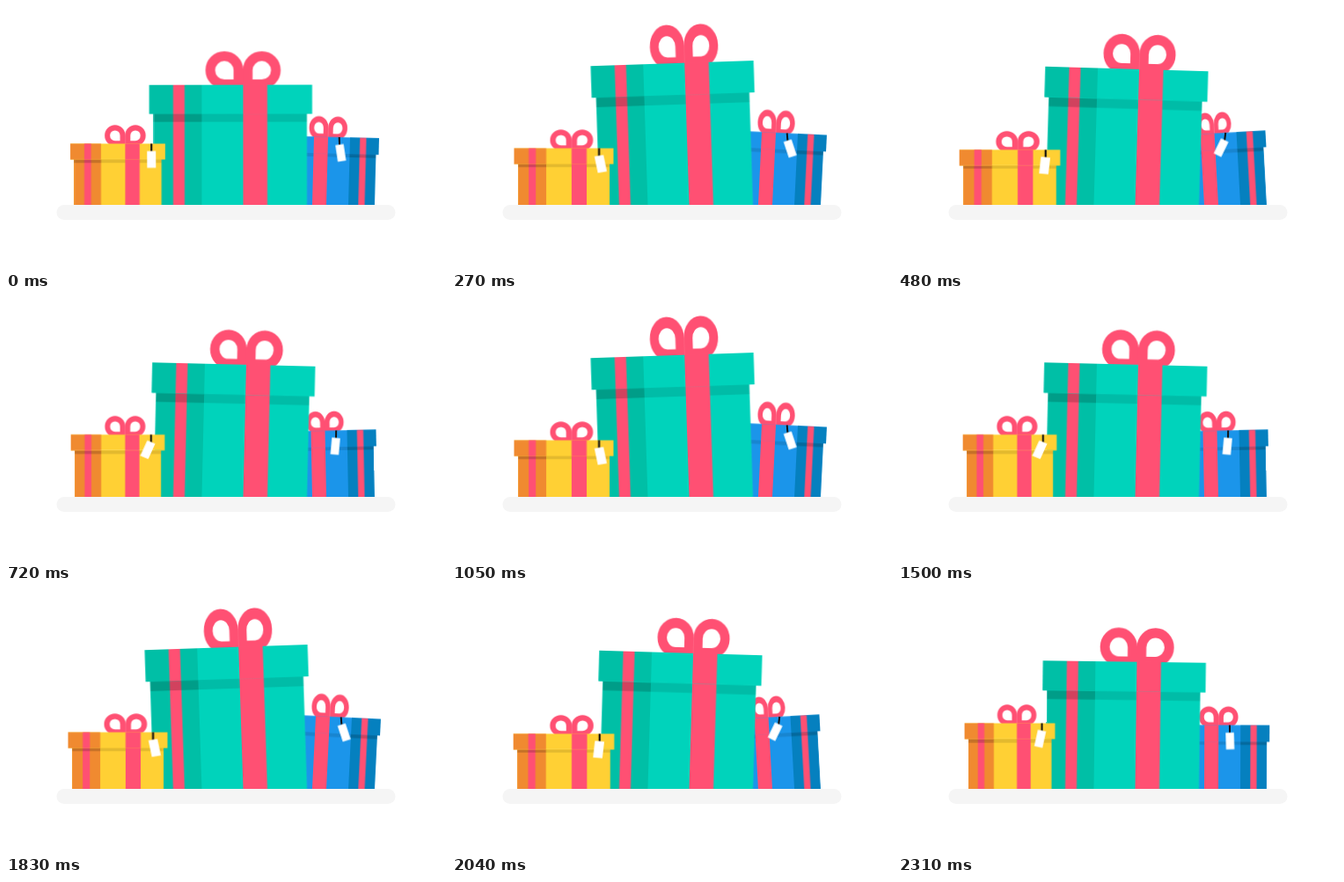
An HTML page that plays this animation: 500x300 px, repeating every 2340 ms.

```html
<!DOCTYPE html>
<html lang="en">
<head>
<meta charset="utf-8">
<title>Dancing gifts</title>
<style>
  html, body { margin: 0; width: 100%; height: 100%; overflow: hidden; background: #fff; }
  svg { display: block; width: 100%; height: 100%; }

  .pink { fill: #ff5073; }
  .shade { fill: #000; fill-opacity: .11; }
  .shade-dark { fill: #000; fill-opacity: .18; }
  .green { fill: #00d3bb; } .green-dark { fill: #00bfa6; }
  .yellow { fill: #ffd034; } .yellow-dark { fill: #f08a30; }
  .blue { fill: #1b95ea; } .blue-dark { fill: #0580bf; }
  .string { stroke: #111; stroke-width: 2; }

  /* Each moving part leaves its rest pose for --a, returns, then goes to --b. */
  .sway { animation: sway 780ms infinite; }
  .early .sway { animation-delay: -33ms; }
  @keyframes sway {
    0%, 50%, 100% { transform: none; animation-timing-function: cubic-bezier(.333, 1, .667, 1); }
    25% { transform: var(--a); animation-timing-function: cubic-bezier(.333, 0, .667, 0); }
    75% { transform: var(--b); animation-timing-function: cubic-bezier(.333, 0, .667, 0); }
  }

  .swing {
    animation: swing calc(var(--time) / 2) cubic-bezier(.364, 0, .636, 1) infinite alternate;
    animation-delay: calc(var(--time) / -4 - var(--lead));
  }
  @keyframes swing {
    from { transform: rotate(var(--angle)); }
    to { transform: rotate(calc(var(--angle) * -1)); }
  }
</style>
</head>
<body>
<svg viewBox="0 0 500 300" preserveAspectRatio="none">
  <defs>
    <clipPath id="above"><rect width="500" height="226"/></clipPath>
    <path id="loop" d="M-5.3-.5V-16.5A16 16 0 1 0-21.3-.5Z" fill="none" stroke="#ff5073" stroke-width="11"/>
    <g id="bow">
      <use href="#loop"/>
      <use href="#loop" transform="scale(-1 1)"/>
    </g>
    <rect id="tag" x="-4.7" y="-.5" width="9.4" height="19" fill="#fff"/>
  </defs>

  <rect x="57.5" y="226" width="385" height="17" rx="8.5" fill="#f5f5f5"/>

  <g clip-path="url(#above)">
    <!-- blue box -->
    <g class="early" transform="translate(369 226)">
      <g class="sway" style="--a:rotate(3.4deg);--b:rotate(-3.3deg)">
        <g class="sway" style="--a:scaleY(1.235);--b:scaleY(1.197)">
          <rect class="blue" x="-49.5" y="-54" width="99" height="59"/>
          <rect class="blue-dark" x="20" y="-54" width="29.8" height="59"/>
          <rect class="shade" x="-49.5" y="-54" width="69.5" height="4.6"/>
          <rect class="pink" x="-21" y="-54" width="16" height="59"/>
          <rect class="pink" x="31.3" y="-54" width="7.2" height="59"/>
          <rect class="shade-dark" x="20" y="-54" width="29.8" height="4.6"/>
        </g>
        <g class="sway" style="--a:translateY(-12.5px);--b:translateY(-10.5px)">
          <g transform="translate(-5 -71.7) scale(.523 .55)">
            <g class="sway" style="--a:scale(.93,1.27);--b:scale(.87,1.14)"><use href="#bow"/></g>
          </g>
          <rect class="blue" x="-53" y="-71.7" width="106" height="18.8"/>
          <rect class="blue-dark" x="20" y="-71.7" width="33" height="18.8"/>
          <rect class="pink" x="-21" y="-71.7" width="16" height="18.9"/>
          <rect class="pink" x="31.3" y="-71.7" width="7.2" height="18.9"/>
          <g transform="translate(7.7 -71.7)" style="--time:780ms;--lead:426ms">
            <g class="swing" style="--angle:-12deg">
              <path class="string" d="M0 0V9"/>
              <g transform="translate(0 9)">
                <g class="swing" style="--angle:-22deg"><use href="#tag"/></g>
              </g>
            </g>
          </g>
        </g>
      </g>
    </g>

    <!-- green box -->
    <g transform="translate(255.5 226)">
      <g class="sway" style="--a:rotate(-2deg);--b:rotate(2deg)">
        <g class="sway" style="--a:scaleY(1.225);--b:scaleY(1.194)">
          <rect class="green" x="-87.5" y="-104" width="174" height="109"/>
          <rect class="green-dark" x="-87.5" y="-104" width="54.5" height="109"/>
          <rect class="shade" x="-33" y="-104" width="119.5" height="10"/>
          <rect class="pink" x="-65.5" y="-104" width="13" height="109"/>
          <rect class="pink" x="14" y="-104" width="27.5" height="109"/>
          <rect class="shade-dark" x="-87.5" y="-104" width="54.5" height="10"/>
        </g>
        <g class="sway" style="--a:translateY(-26.5px);--b:translateY(-22px)">
          <g transform="translate(14 -136)">
            <g class="sway" style="--a:scale(.9,1.16);--b:scale(.95,1.05)"><use href="#bow"/></g>
          </g>
          <g transform="translate(0 -136)">
            <g class="sway" style="--a:scaleY(1.1);--b:scaleY(1.06)">
              <rect class="green" x="-92.5" width="185" height="33"/>
              <rect class="green-dark" x="-92.5" width="59.5" height="33"/>
              <rect class="pink" x="-65.5" width="13" height="33"/>
              <rect class="pink" x="14" width="27.5" height="33"/>
            </g>
          </g>
        </g>
      </g>
    </g>

    <!-- yellow box -->
    <g class="early" transform="translate(127 226)">
      <g class="sway" style="--a:scaleX(1.13);--b:scaleX(1.13)">
        <g class="sway" style="--a:scaleY(.765);--b:scaleY(.765)">
          <rect class="yellow" x="-46.8" y="-58" width="93.8" height="63"/>
          <rect class="yellow-dark" x="-46.8" y="-58" width="28.8" height="63"/>
          <rect class="shade" x="-18" y="-58" width="65" height="4.8"/>
          <rect class="pink" x="-36" y="-58" width="7.3" height="63"/>
          <rect class="pink" x="8" y="-58" width="15.5" height="63"/>
          <rect class="shade-dark" x="-46.8" y="-58" width="28.8" height="4.8"/>
        </g>
        <g class="sway" style="--a:translateY(13.5px);--b:translateY(13.5px)">
          <g transform="translate(8 -75.5) scale(.515 .56)"><use href="#bow"/></g>
          <rect class="yellow" x="-51" y="-75.5" width="102" height="18"/>
          <rect class="yellow-dark" x="-51" y="-75.5" width="33" height="18"/>
          <rect class="pink" x="-36" y="-75.5" width="7.3" height="18.1"/>
          <rect class="pink" x="8" y="-75.5" width="15.5" height="18.1"/>
          <g transform="translate(36.2 -75.5)">
            <path class="string" d="M0 0V9"/>
            <g transform="translate(0 9)">
              <g class="swing" style="--angle:-28deg;--time:780ms;--lead:390ms">
                <g class="swing" style="--angle:-13deg;--time:390ms;--lead:195ms"><use href="#tag"/></g>
              </g>
            </g>
          </g>
        </g>
      </g>
    </g>
  </g>
</svg>
</body>
</html>
```
